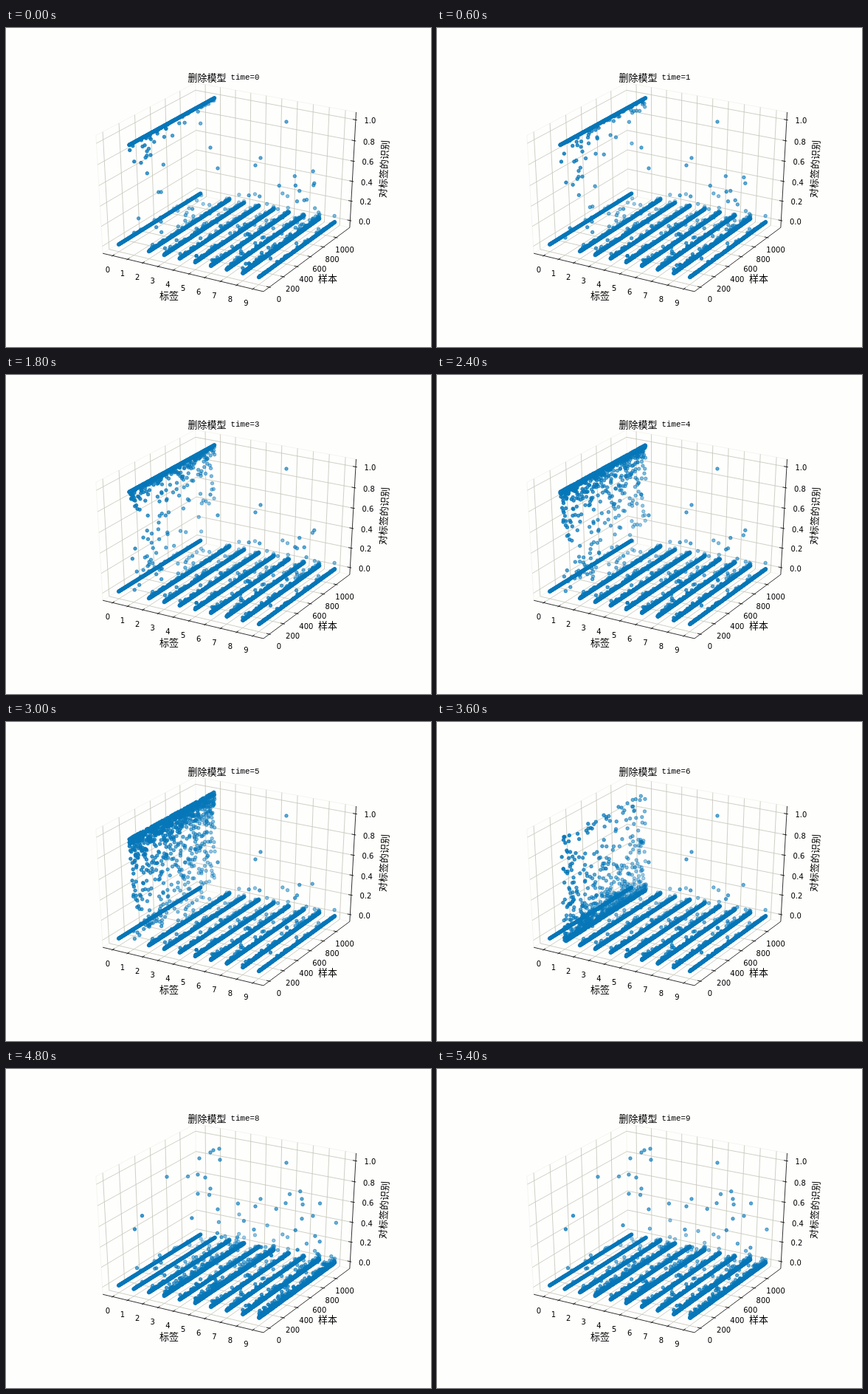
Write an HTML page with a canvas that moves like this. It is 576 px wide and 432 px high and loops after 6 s.

```html
<!DOCTYPE html>
<html lang="zh">
<head>
<meta charset="utf-8">
<style>
  html, body { margin: 0; width: 100%; height: 100%; overflow: hidden; background: #fefefd; }
  svg, canvas { position: absolute; left: 0; top: 0; width: 576px; height: 432px; }
  text { fill: #000; text-anchor: middle; dominant-baseline: central; }
  .tick { font: 10px "DejaVu Sans", sans-serif; }
  .label { font: 13px "Noto Sans CJK SC", "Noto Sans CJK", sans-serif; }
  .time { font: 10.8px "Liberation Mono", monospace; text-anchor: start; }
  line { stroke-width: 0.8; }
</style>
</head>
<body>
<svg id="axes" viewBox="0 0 576 432"></svg>
<canvas id="plot" width="576" height="432"></canvas>
<script>
const STEP = 600, STEPS = 10, LABELS = 10, SAMPLES = 1135;
const LOW = -1 / 48, HIGH = 49 / 48;
const svg = document.getElementById('axes');
const ctx = document.getElementById('plot').getContext('2d');

// Perspective camera: elevation 30, azimuth -60, distance 10, unit box.
function project([a, b, c]) {
  const x = a - 0.5, y = b - 0.5, z = c - 0.5;
  const depth = 10 - (0.433 * x - 0.75 * y + 0.5 * z);
  return {
    x: 301.2 + 2413 * (0.866 * x + 0.5 * y) / depth,
    y: 210.5 - 1750 * (-0.25 * x + 0.433 * y + 0.866 * z) / depth,
    depth
  };
}
const inset = v => (v + 0.05) / 1.1;
const labelPos = k => inset(k / (LABELS - 1));
const samplePos = i => inset(i / (SAMPLES - 1));
const times = (n, make) => Array.from({ length: n }, (_, i) => make(i));

function add(name, attrs, content = '') {
  const el = document.createElementNS('http://www.w3.org/2000/svg', name);
  for (const key in attrs) el.setAttribute(key, attrs[key]);
  el.textContent = content;
  return svg.appendChild(el);
}
function path(stroke, ...corners) {
  corners.map(project).reduce((p, q) => {
    add('line', { x1: p.x, y1: p.y, x2: q.x, y2: q.y, stroke });
    return q;
  });
}
function write(cls, x, y, content, turn = 0) {
  return add('text', { class: cls, x, y, transform: `rotate(${turn} ${x} ${y})` }, content);
}

function drawAxes() {
  const grid = '#c4c4b8', edge = '#f1f1ea', ink = '#000';

  path(edge, [LOW, LOW, LOW], [LOW, LOW, HIGH], [LOW, HIGH, HIGH], [HIGH, HIGH, HIGH]);
  path(edge, [LOW, LOW, LOW], [LOW, HIGH, LOW], [HIGH, HIGH, LOW]);
  path(edge, [LOW, HIGH, LOW], [LOW, HIGH, HIGH]);

  times(LABELS, k => {
    const x = labelPos(k), p = project([x, LOW, LOW]);
    path(grid, [x, LOW, LOW], [x, HIGH, LOW], [x, HIGH, HIGH]);
    path(ink, [x, LOW - 0.01, LOW], [x, LOW + 0.02, LOW]);
    write('tick', p.x - 6.5 - 0.28 * k, p.y + 19.5, k);
  });
  times(6, k => {
    const y = samplePos(k * 200), p = project([HIGH, y, LOW]);
    path(grid, [HIGH, y, LOW], [LOW, y, LOW], [LOW, y, HIGH]);
    path(ink, [HIGH - 0.018, y, LOW], [HIGH + 0.009, y, LOW]);
    write('tick', p.x + 13 - 0.3 * k, p.y + 17, k * 200);
  });
  times(6, k => {
    const z = inset(k / 5), p = project([HIGH, HIGH, z]);
    path(grid, [LOW, LOW, z], [LOW, HIGH, z], [HIGH, HIGH, z]);
    path(ink, [HIGH - 0.018, HIGH, z], [HIGH + 0.009, HIGH, z]);
    write('tick', p.x + 19.5, p.y + 1.5, (k / 5).toFixed(1));
  });
  path(ink, [LOW, LOW, LOW], [HIGH, LOW, LOW], [HIGH, HIGH, LOW], [HIGH, HIGH, HIGH]);

  write('label', 221, 361, '标签');
  write('label', 436, 338, '样本');
  write('label', 511.5, 191, '对标签的识别', -87);
  write('label', 272.5, 66.5, '删除模型');
  return write('time', 304.5, 66.5, '');
}

function seeded(seed) {
  return () => {
    seed = (seed + 0x6d2b79f5) | 0;
    let t = Math.imul(seed ^ (seed >>> 15), 1 | seed);
    t = (t + Math.imul(t ^ (t >>> 7), 61 | t)) ^ t;
    return ((t ^ (t >>> 14)) >>> 0) / 4294967296;
  };
}
const sigmoid = v => 1 / (1 + Math.exp(-v));

// One logistic draw per sample, kept through all steps.
const noise = times(LABELS, k => {
  const random = seeded(71 + k * 13);
  return times(SAMPLES, () => {
    const u = 0.0004 + 0.9992 * random();
    return Math.log(u / (1 - u));
  });
});

// Label 1 loosens from the top, drops at step 6 and settles on the floor.
function forgetting(step) {
  if (step > 6) return [-13, 2];
  if (step === 6) return [-3.6, 1.75];
  const certain = (1 - step / 5) ** 1.3;
  return [2.9 + 15.7 * certain, 1.6 + 3.4 * certain];
}

// Share of samples off the floor; labels 3, 5 and 9 burst at step 7 and calm down.
function risenShare(step, k) {
  if (k === 0) return 0.001;
  if (step >= 7 && [3, 5, 9].includes(k)) return 0.12 * 0.7 ** (step - 7);
  if (k === 8) return step >= 7 ? 0.05 : 0.02 + 0.04 * Math.exp(-step / 2);
  return k === 9 ? 0.005 : 0.016;
}

function heightRule(step, k) {
  const [centre, spread] = k === 1
    ? forgetting(step)
    : [-3.5 + 0.8 * Math.log(risenShare(step, k)), 0.8];
  return n => sigmoid(centre + spread * n);
}

// Lone points on the stage: some stay, some come late, the rest are scattered.
const lasting = [[380, 127], [345, 176], [338, 186], [277, 162], [287, 190]];
const late = [[218, 146], [262, 121], [277, 113], [281, 110], [289, 108], [290, 123],
  [260, 143], [270, 147], [260, 169], [401, 176]];

function lonePoints(step) {
  const random = seeded(step < 7 ? 5 : 23);
  const count = step < 7 ? 9 - step : 20 - 4 * (step - 7);
  const left = step < 7 ? 320 : 260, top = step < 7 ? 200 : 165;
  const scattered = times(count, () => [left + (428 - left) * random(), top + (245 - top) * random()]);
  return [...lasting, ...(step < 7 ? [] : late), ...scattered];
}

function dot(x, y, alpha) {
  ctx.globalAlpha = alpha;
  ctx.beginPath();
  ctx.arc(x, y, 2.24, 0, 2 * Math.PI);
  ctx.fill();
  ctx.stroke();
}
function drawPoints(step) {
  ctx.clearRect(0, 0, 576, 432);
  ctx.fillStyle = ctx.strokeStyle = '#0878b9';
  ctx.lineWidth = 1;
  for (let k = 0; k < LABELS; k++) {
    const height = heightRule(step, k);
    for (let i = SAMPLES - 1; i >= 0; i--) {
      const z = height(noise[k][i]);
      const settled = z < 0.006 || z > 0.994;
      if (settled && i % 2) continue; // neighbours already cover it
      const p = project([labelPos(k), samplePos(i), inset(z)]);
      const far = Math.min(1, Math.max(0, (p.depth - 9.4) / 1.36));
      dot(p.x, p.y, 1 - 0.7 * far);
    }
  }
  lonePoints(step).forEach(([x, y]) => dot(x, y, 0.65));
}

const clock = drawAxes();
let shown = -1;
function tick() {
  const step = Math.floor(performance.now() / STEP) % STEPS;
  if (step !== shown) {
    shown = step;
    clock.textContent = `time=${step}`;
    drawPoints(step);
  }
  requestAnimationFrame(tick);
}
tick();
</script>
</body>
</html>
```
